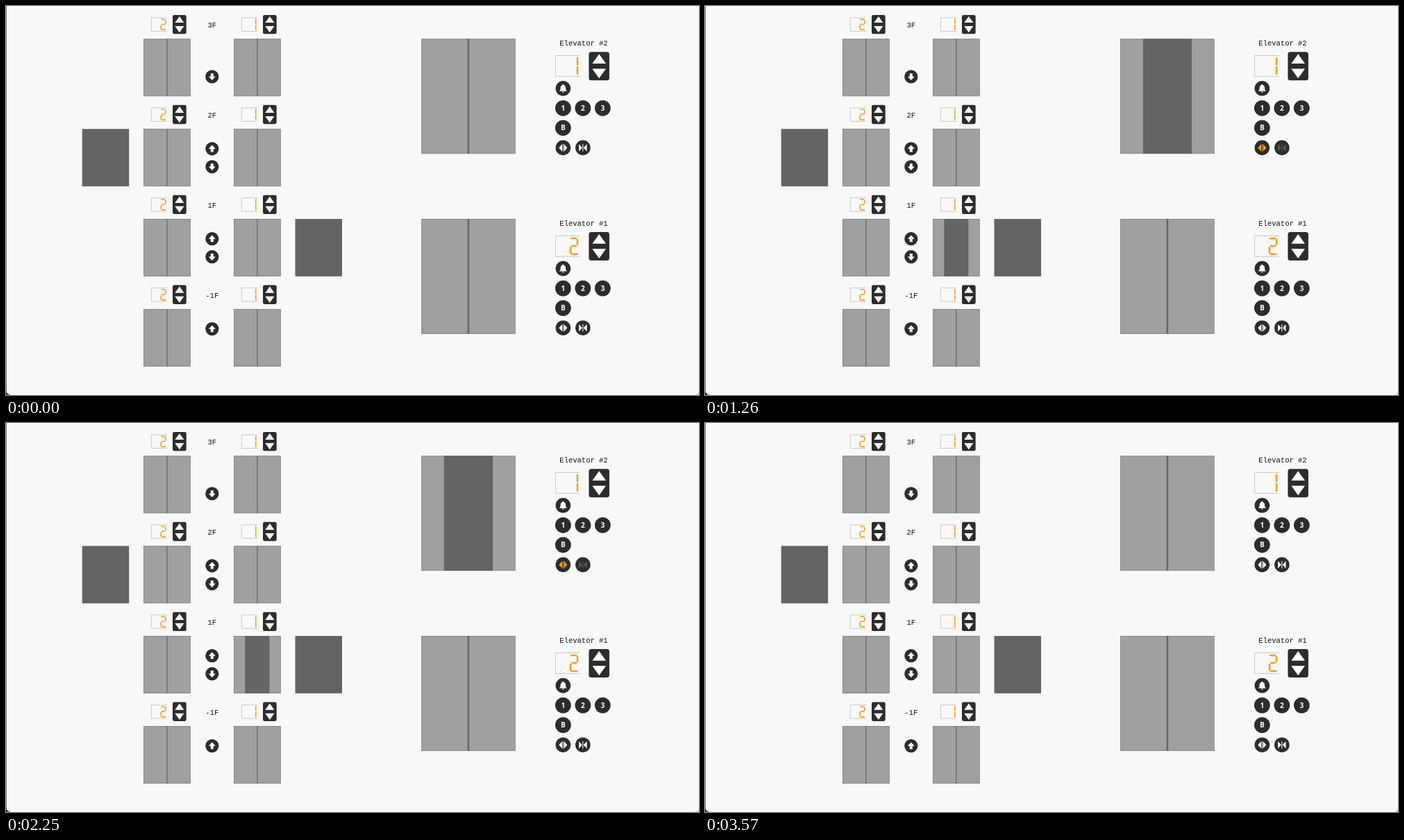
Write an HTML page that moves like this. It is 998 px wide and 561 px high and loops after 4200 ms.

```html
<!DOCTYPE html>
<html lang="en">
<head>
<meta charset="utf-8">
<title>Elevators</title>
<style>
  html, body { margin: 0; width: 100%; height: 100%; overflow: hidden; background: #f8f8f8; }
  svg { display: block; width: 998px; height: 561px; }
  .label { font: 10.5px "Liberation Mono", monospace; fill: #111; text-anchor: middle; }
  .key { font: 600 10px "Noto Sans", "Open Sans", sans-serif; fill: #fff; text-anchor: middle; }
  .seg { fill: none; stroke: #f5a01e; stroke-width: 2.6; }
  .frame { fill: none; stroke: #bdbdbd; }
  .dark { fill: #2c2c2c; }
  .shaft { fill: #646464; }
  .door { fill: #a0a0a0; }
  .icon { fill: #fff; }
</style>
</head>
<body>
<svg id="stage" viewBox="0 0 998 561"></svg>
<script>
const LOOP = 4200, STEP = 30, PITCH = 129.9;
const WHITE = '#fff', DIM = '#555', LIT = '#f89a1c';

// [time, half width of the cab door gap]
const GAP = [
  [0, 1.25], [925, 1.25], [1260, 35], [1300, 39.4], [1440, 25.4], [1530, 16], [1680, 1.25],
  [1915, 1.25], [2250, 35.2], [2396, 50.6], [2430, 46.6], [2610, 28], [2880, 1.25], [LOOP, 1.25]
];
// [time, colour]
const OPEN = [[0, WHITE], [720, DIM], [930, LIT], [1305, WHITE], [1740, DIM], [1920, LIT], [2400, WHITE]];
const CLOSE = [[0, WHITE], [1110, DIM], [1305, LIT], [1920, WHITE], [2190, DIM], [2400, LIT], [3570, WHITE]];

const ICONS = {
  up: 'M0-5.2L5 .2H2V4.6H-2V.2H-5Z',
  down: 'M0 5.2L5-.2H2V-4.6H-2V-.2H-5Z',
  bell: 'M0-5.8C.8-5.8 1.2-5.2 1.2-4.6C3-4 3.8-2.4 3.8-.6V1.8L5.2 3.4V4H-5.2V3.4L-3.8 1.8V-.6C-3.8-2.4-3-4-1.2-4.6C-1.2-5.2-.8-5.8 0-5.8ZM-1.4 4.6H1.4A1.4 1.3 0 0 1-1.4 4.6Z',
  open: 'M-6 0L-1.3-5.3V5.3ZM6 0L1.3-5.3V5.3ZM-.4-5.3H.4V5.3H-.4Z',
  close: 'M-1 0L-5.7-5.3V5.3ZM1 0L5.7-5.3V5.3ZM-.5-5.3H.5V5.3H-.5Z'
};
const DIGITS = {
  1: 'M32 3V14.2M32 16V28',
  2: 'M22 4.2H31M32 5V14M31 15.2H23M22 16.4V26.4M23 27H32.5'
};

const at = (x, y, s, body) => `<g transform="translate(${x} ${y}) scale(${s})">${body}</g>`;
const rect = (cls, x, y, w, h, extra = '') =>
  `<rect class="${cls}" x="${x}" y="${y}" width="${w}" height="${h}" ${extra}/>`;
const text = (cls, x, y, s) => `<text class="${cls}" x="${x}" y="${y}">${s}</text>`;

const button = (x, y, r, name, id = '') => at(x, y, 1,
  `<circle class="dark" r="${r}"/><path class="icon" ${id && `id="${id}"`} d="${ICONS[name]}"/>`);
const key = (x, y, s) => at(x, y, 1, '<circle class="dark" r="11.4"/>' + text('key', 0, 3.6, s));

const display = (x, y, s, n) => at(x, y, s,
  `<path class="frame" stroke-width="${0.8 / s}" d="M35.5 .5H.5V30.5H35.5"/><path class="seg" d="${DIGITS[n]}"/>`);
const arrows = (x, y, s) => at(x, y, s, rect('dark', 0, 0, 29.5, 41, 'rx="3.5"') +
  '<path class="icon" d="M14.75 3L24.6 16.8H4.9ZM14.75 38L24.6 24.2H4.9Z"/>');

// s = 1 is the cab size, s = 0.5 the landing size
function doors(x, y, s, moving) {
  const w = 135.4 * s, h = 165.8 * s, mid = x + w / 2;
  return rect('shaft', x, y, w, h) + rect('door', x + .4, y + .4, w - .8, h - .8) +
    rect('shaft', mid - 1.25 * s, y, 2.5 * s, h, moving ? `data-mid="${mid}" data-scale="${s}"` : '');
}

function landing(row, name) {
  const y = row * PITCH;
  let out = text('label', 296.8, y + 30.8, name);
  [[198, 2], [328, 1]].forEach(([x, n]) => {
    out += display(x + 11, y + 16.6, .65, n) + arrows(x + 42, y + 12.9, .667);
    out += doors(x, y + 47.3, .5, n === 1 && row === 2);
  });
  if (row > 0) out += button(296.8, y + 75.9, 9.6, 'up');
  if (row < 3) out += button(296.8, y + 101.9, 9.6, 'down');
  return out;
}

function cab(row, name, n, moving) {
  const y = row * PITCH, cols = [802.3, 830.8, 859.3];
  return doors(598.2, y + 47.3, 1, moving) +
    text('label', 832, y + 56.8, name) +
    display(791, y + 71, 1, n) + arrows(839.4, y + 66.2, 1) +
    button(cols[0], y + 118.8, 10.8, 'bell') +
    cols.map((x, i) => key(x, y + 147.3, i + 1)).join('') +
    key(cols[0], y + 175.8, 'B') +
    button(cols[0], y + 204.4, 10.8, 'open', moving && 'open') +
    button(cols[1], y + 204.4, 10.8, 'close', moving && 'close');
}

const stage = document.getElementById('stage');
stage.innerHTML =
  rect('back', 0, 0, 998, 561, 'fill="#f8f8f8"') +
  rect('edge', 0, 0, 1, 561, 'fill="#777"') +
  '<path d="M0 554Q1 560 7 561H0Z" fill="#333"/><path d="M998 555Q997 560 992 561H998Z" fill="#ccc"/>' +
  rect('shaft', 109.7, 177.3, 67.5, 82.8) +
  rect('shaft', 416.5, 307.1, 67.5, 82.8) +
  ['3F', '2F', '1F', '-1F'].map((name, i) => landing(i, name)).join('') +
  cab(0, 'Elevator #2', 1, true) + cab(2, 'Elevator #1', 2, false);

const gaps = [...stage.querySelectorAll('[data-mid]')];
const openIcon = document.getElementById('open');
const closeIcon = document.getElementById('close');

function lerpAt(table, t) {
  const i = table.findIndex(k => k[0] > t);
  const [t0, a] = table[i - 1], [t1, b] = table[i];
  return a + (b - a) * (t - t0) / (t1 - t0);
}
const holdAt = (table, t) => table.filter(k => k[0] <= t).pop()[1];

function draw(t) {
  const half = lerpAt(GAP, t);
  gaps.forEach(g => {
    const w = half * g.dataset.scale;
    g.setAttribute('x', g.dataset.mid - w);
    g.setAttribute('width', 2 * w);
  });
  openIcon.style.fill = holdAt(OPEN, t);
  closeIcon.style.fill = holdAt(CLOSE, t);
}

const start = performance.now();
function tick() {
  const t = (performance.now() - start) % LOOP;
  draw(Math.floor(t / STEP) * STEP);
  requestAnimationFrame(tick);
}
tick();
</script>
</body>
</html>
```
